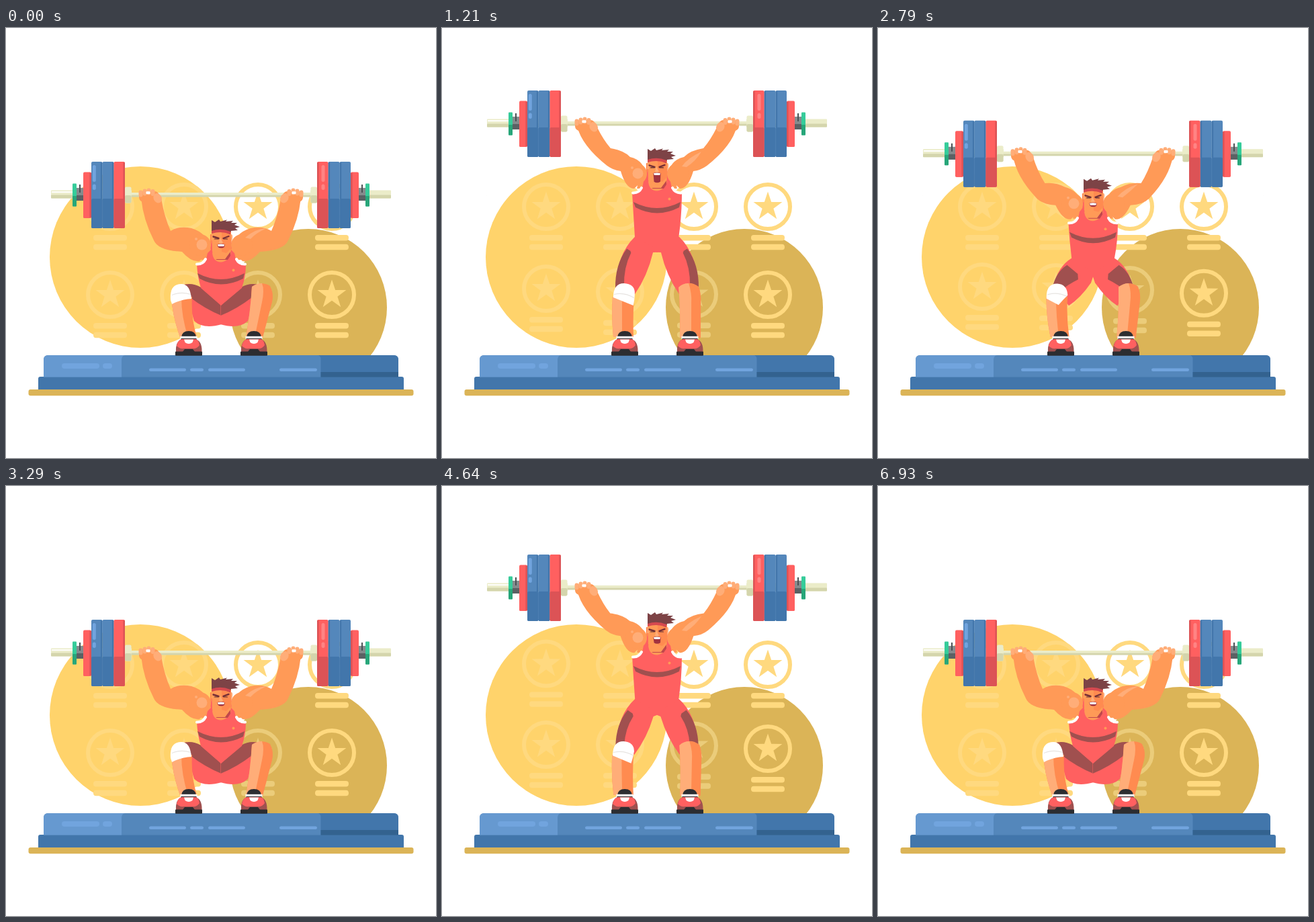
Recreate the animation shown at these times as an HTML page. Size 640 px wide and 640 px high, loop 7.21 s.

```html
<!DOCTYPE html>
<html lang="en">
<head>
<meta charset="utf-8">
<title>Weightlifter</title>
<style>
html, body { margin: 0; width: 100%; height: 100%; overflow: hidden; background: #fff; }
svg { display: block; width: 100%; height: 100%; }
</style>
</head>
<body>
<svg id="stage" viewBox="0 0 640 640"></svg>
<script>
const C = {
  red: '#ff6060', redDark: '#dc5356', maroon: '#a0504f', hair: '#7d4346',
  skin: '#ff9a57', skinLight: '#ffad78', skinDark: '#ff8b50',
  blue: '#5487bb', blueDark: '#4276ab', blueLight: '#6699d0', shine: '#71a4de',
  yellow: '#ffd36b', gold: '#dbb457', medal: '#ffd97f', medalDim: '#ebcc7a',
  steel: '#ebecc9', steelDark: '#d4d5ac', black: '#2c2d31'
};
const LOOP = 7210, LIFT = 3600, STEP = 1000 / 14, RISE = 107;

const rect = (x, y, w, h, fill, r = 0) =>
  `<rect x="${x}" y="${y}" width="${w}" height="${h}" rx="${r}" fill="${fill}"/>`;
const path = (d, fill) => `<path d="${d}" fill="${fill}"/>`;
const line = (d, color, width) =>
  `<path d="${d}" fill="none" stroke="${color}" stroke-width="${width}" stroke-linecap="round"/>`;
const circle = (x, y, r, fill) => `<circle cx="${x}" cy="${y}" r="${r}" fill="${fill}"/>`;
const mirror = s => `<g transform="matrix(-1 0 0 1 640 0)">${s}</g>`;

// Shapes that change between the squat and the standing pose.
const morphs = [];
function morph(squat, stand, fill) {
  morphs.push([squat, stand]);
  return `<path class="morph" fill="${fill}"/>`;
}
function blend(a, b, p) {
  const target = b.match(/-?[\d.]+/g);
  let i = 0;
  return a.replace(/-?[\d.]+/g, n => (+n + (target[i++] - n) * p).toFixed(2));
}

function star(outer, inner) {
  let points = '';
  for (let i = 0; i < 10; i++) {
    const r = i % 2 ? inner : outer, a = Math.PI * (i / 5 - 0.5);
    points += `${(r * Math.cos(a)).toFixed(2)},${(r * Math.sin(a)).toFixed(2)} `;
  }
  return points;
}

function medals() {
  let s = '';
  for (let row = 0; row < 2; row++) for (let col = 3; col >= 0; col--) {
    const color = row && col === 2 ? C.medalDim : C.medal;
    s += `<g class="medal" data-x="${155 + 110 * col}" data-y="${266 + 131 * row}" fill="${color}">
      <circle r="33" fill="none" stroke="${color}" stroke-width="6"/>
      <polygon points="${star(22.5, 8.8)}"/>
      ${rect(-25, 42, 50, 8.4, color, 4)}${rect(-25, 55.8, 50, 8.4, color, 4)}</g>`;
  }
  return s;
}

function platform() {
  const pills = [[213, 55], [274, 20], [301, 55], [407, 56]];
  return rect(33.5, 538, 573, 9.3, C.gold, 3) +
    path('M48 538V522Q48 519 51 519H589Q592 519 592 522V538Z', C.blueDark) +
    path('M56 519.5V494Q56 487 63 487H577Q584 487 584 494V519.5Z', C.blue) +
    path('M56 519.5V494Q56 487 63 487H177Q172 488 172 494V519.5Z', C.blueLight) +
    path('M468.5 519.5V492Q468 487 463 487H577Q584 487 584 494V519.5Z', C.blueDark) +
    rect(468.5, 512, 115.5, 7.6, '#33628f') +
    rect(83, 499, 56, 8, C.shine, 4) + rect(144, 499, 14, 8, C.shine, 4) +
    pills.map(([x, w]) => rect(x, 506.5, w, 4.6, C.shine, 2.3)).join('');
}

function plate(x, y, w, h, top, bottom, edge) {
  return rect(x, y, w, h, top, 2) + rect(x, 254, w, y + h - 254, bottom, 2) +
    rect(x + w - 2.6, y + 1, 2.6, h - 2, edge, 1);
}
function weights() {
  return rect(67, 241.5, 120, 12, C.steel, 1) + rect(67, 248.5, 120, 5, C.steelDark, 1) +
    rect(105, 238, 10, 19, '#858b8d') + rect(105, 249, 10, 8, '#5b6164') +
    rect(109, 233, 2, 12, '#4a5154') +
    rect(99, 231.5, 6, 34, '#36cc9a', 1) + rect(99, 250, 6, 15.5, '#27a679', 1) +
    rect(177, 236.5, 9.5, 24, C.steel, 2) + rect(177, 249, 9.5, 11.5, C.steelDark, 2) +
    plate(115, 214.5, 12, 68.5, C.red, C.red, C.redDark) +
    plate(127, 199, 16.5, 99, C.blue, C.blueDark, C.blueDark) +
    plate(143.5, 199, 17, 99, C.blue, C.blueDark, C.blueDark) +
    plate(160.5, 199, 16.5, 99, C.red, C.redDark, C.redDark);
}
function barbell() {
  return rect(180, 245, 280, 4, C.steel) + rect(180, 248.6, 280, 3, C.steelDark) +
    weights() + mirror(weights()) + rect(68, 243.2, 31, 2, '#fff') +
    rect(128.8, 204, 5, 25, C.shine, 2.5) + rect(128.8, 232.5, 5, 8.5, C.shine, 2.5) +
    rect(469.5, 204, 5, 25, '#ff8484', 2.5) + rect(469.5, 232.5, 5, 8.5, '#ff8484', 2.5);
}

function shoe() {
  return path('M261 460Q262 451 272 451Q282 451 283 460Z', C.black) +
    rect(259.5, 458.8, 25, 4, '#fff') + rect(260.5, 462, 23, 2.2, C.black) +
    path('M253 482Q252 466 262 463H282Q292 466 291.5 482Z', C.maroon) +
    path('M254 473Q256 464 262 463H282Q287 464 288 472Q284 478 278 477H265Q258 478 254 473Z', C.red) +
    path('M265 463.5H279L277.5 468Q272 472 266.5 468Z', '#fff') +
    rect(252, 481.5, 40, 6.2, C.black, 1) + path('M262 483L266 478H278L282 483Z', C.black);
}

function thigh() {
  return morph(
    'M321 410L290 386Q278 380 264 382L280 436Q294 449 321 441L321 413Z',
    'M321 305L287 310Q260 336 258 388L287 396Q306 368 314 333L321 333Z', C.red) +
    morph(
      'M262 383Q276 378 290 386L320.5 413L320.5 428Q296 418 274 401Z',
      'M258 388Q257 352 275 328L280 331L281 334Q270 356 271 384Z', C.maroon);
}

function legs() {
  return thigh() + mirror(thigh()) +
    morph('M246 400L277 400Q275 430 284 460L259 460Q248 430 246 400Z',
      'M254 400L286 400Q284 430 285 460L255 460Q252 430 254 400Z', C.skinDark) +
    morph('M246 400L261 400Q261 430 271 460L259 460Q248 430 246 400Z',
      'M254 400L268 400Q268 430 268 460L255 460Q252 430 254 400Z', C.skinLight) +
    morph('M245 405Q243 381 261 381Q274 381 276 403Q260 404 247 411Z',
      'M255 401Q255 380 271 380Q287 381 287 394Q287 405 285 413Q270 404 255 404Z', '#fff') +
    `<g opacity=".8">${morph('M247 397Q260 391 275 396L275 397Q260 392.5 247 398Z',
      'M256 396Q271 392 286 401L286 402.2Q271 393.5 256 397Z', '#e1ddda')}</g>` +
    morph('M366 385Q381 376 393 384Q399 395 396 408L382 461L357 461Q364 420 366 385Z',
      'M352 386Q367 374 382 385Q386 395 385 410L385 461L354 461Q355 420 352 386Z', C.skinDark) +
    morph('M366 385Q373 380 381 380Q385 390 381 408L370 461L357 461Q364 420 366 385Z',
      'M352 386Q358 380 367 380Q372 395 371 410L371 461L354 461Q355 420 352 386Z', C.skinLight) +
    shoe() + `<g transform="translate(97 0)">${shoe()}</g>`;
}

function arm() {
  return morph(
    'M201 252Q204 285 220 316Q226 331 262 333Q276 349 288 347L305 330Q300 305 276 298Q258 294 245 302Q236 282 231 254Z',
    'M201 252Q208 281 246 311Q256 318 266 319Q274 346 286 345L304 328Q302 303 280 298Q270 288 251 285Q240 272 231 254Z',
    C.skin) + circle(289, 323, 16, C.skin);
}

function hand() {
  const fingers = [[197.5, 241.5], [203.5, 239.5], [209.5, 238.5], [215.5, 240]];
  return rect(198, 243, 30, 16, C.skin, 7) +
    fingers.map(([x, y]) => rect(x, y, 6, 10, C.skinLight, 3)).join('') +
    rect(208.5, 243.3, 6, 4, '#fff', 1) +
    `<ellipse cx="225.5" cy="253.5" rx="6" ry="7.5" fill="${C.skinLight}" transform="rotate(-25 225 253)"/>`;
}

function torso() {
  return path('M296 318H344L350 345H290Z', C.skin) +
    morph('M304 316L298 344Q293 353 284 352Q285 370 290 387L320 413L351 387Q357 370 357 352Q347 353 342 344L336 316Z',
      'M304 316L298 344Q293 351 283 351Q285 385 287 418L320 436L352 420Q357 385 357 351Q347 351 342 344L336 316Z', C.red) +
    path('M285 365Q320 383 355 365L353 373Q320 390 288 373Z', C.maroon);
}
function trim() {
  return line('M284 351.5Q293 352 297 344', '#fff', 4);
}

function head() {
  return path('M307 334Q308 348 320 348.5Q332 347 335 334Z', C.skin) +
    path('M312 344H326L334 333V339L330 345H314Z', '#c1484c') +
    path('M304 311Q303 306 306 307V321Q303 319 304 311Z', C.skinDark) +
    path('M334 307Q338 306 337 313Q336 320 334 321Z', C.skinLight) +
    path('M306 302H335V332L327 339H313L307 333Z', C.skin) +
    path('M321 302H335V332L327 339H321Z', C.skinDark) +
    path('M308 331L314 335L321 333L328 335L334 329V333L328 340H313Z', C.skin) +
    path('M306 305V286L311 289L317 285L319 288L329 285.5L327 288L338 287L335 290L344 290L340 293L348 296L341 298L345 301L335 302L333 307Q320 300 306 305Z', C.hair) +
    path('M306 302Q320 297 334 303V307Q320 301.5 306 306Z', '#d6494f') +
    line('M308.5 310.5L316.5 313M323.5 313L331.5 310', '#762f36', 2.4) +
    line('M310.5 314H316M324 314H329.5', '#502b30', 1.2) +
    path('M319 312L317 320H323Z', C.skinLight) +
    '<path id="mouth" fill="#a13340"/>' +
    path('M315 322.2Q320 320.8 325 322.2L324.2 325H316Z', '#fff');
}

const stage = document.getElementById('stage');
stage.innerHTML =
  circle(200, 341, 135, C.yellow) + circle(450, 416, 117, C.gold) + medals() + platform() +
  legs() +
  `<g id="upper">${barbell()}${torso()}${arm()}${mirror(arm())}${trim()}${mirror(trim())}
    ${circle(291.5, 322.5, 8, C.skinLight)}${circle(283, 314, 2, C.skinLight)}
    ${morph('M356 312Q370 299 388 298Q372 305 364 314Z', 'M357 312Q365 300 386 290Q378 304 364 313Z', C.skinLight)}
    ${hand()}${mirror(hand())}${head()}${circle(338.5, 360.5, 2, C.skin)}</g>`;

const upper = document.getElementById('upper');
const mouth = document.getElementById('mouth');
const shapes = [...stage.querySelectorAll('.morph')];
const medalNodes = [...stage.querySelectorAll('.medal')];

const clamp = v => Math.min(1, Math.max(0, v));
const smooth = u => { u = clamp(u); return u * u * (3 - 2 * u); };
// Cubic easing with flat ends; x1 and x2 set how long each end lingers.
function ease(u, x1, x2) {
  u = clamp(u);
  let lo = 0, hi = 1;
  for (let i = 0; i < 24; i++) {
    const s = (lo + hi) / 2, r = 1 - s;
    if (3 * r * r * s * x1 + 3 * r * s * s * x2 + s * s * s < u) lo = s; else hi = s;
  }
  return smooth(lo);
}
const pose = t => ease(t / 1300, 0.6, 0.58) - ease((t - 2075) / 1215, 0.55, 0.8);
const shout = t => smooth((t - 850) / 400) - smooth((t - 1500) / 850);
function bob(t, order) {
  const move = middle => smooth((t - middle - 72 * order) / 260 + 0.5);
  return -12 * (move(205) - move(755) + move(1912) - move(2440));
}

function draw(time) {
  const frame = Math.floor((time % LOOP + 4) / STEP);
  const t = frame * STEP % LIFT;
  const p = pose(t);
  upper.setAttribute('transform', `translate(0 ${(-RISE * p).toFixed(2)})`);
  shapes.forEach((shape, i) => shape.setAttribute('d', blend(...morphs[i], p)));
  const jaw = 327 + 9 * shout(t);
  mouth.setAttribute('d', `M314.5 322Q320 320 325.5 322L325 ${jaw - 1}Q320 ${jaw + 2} 315.5 ${jaw - 1}Z`);
  medalNodes.forEach((node, i) => {
    const y = +node.dataset.y + bob(t, i);
    node.setAttribute('transform', `translate(${node.dataset.x} ${y.toFixed(2)})`);
  });
}

const start = performance.now();
function tick() {
  draw(performance.now() - start);
  requestAnimationFrame(tick);
}
tick();
</script>
</body>
</html>
```
